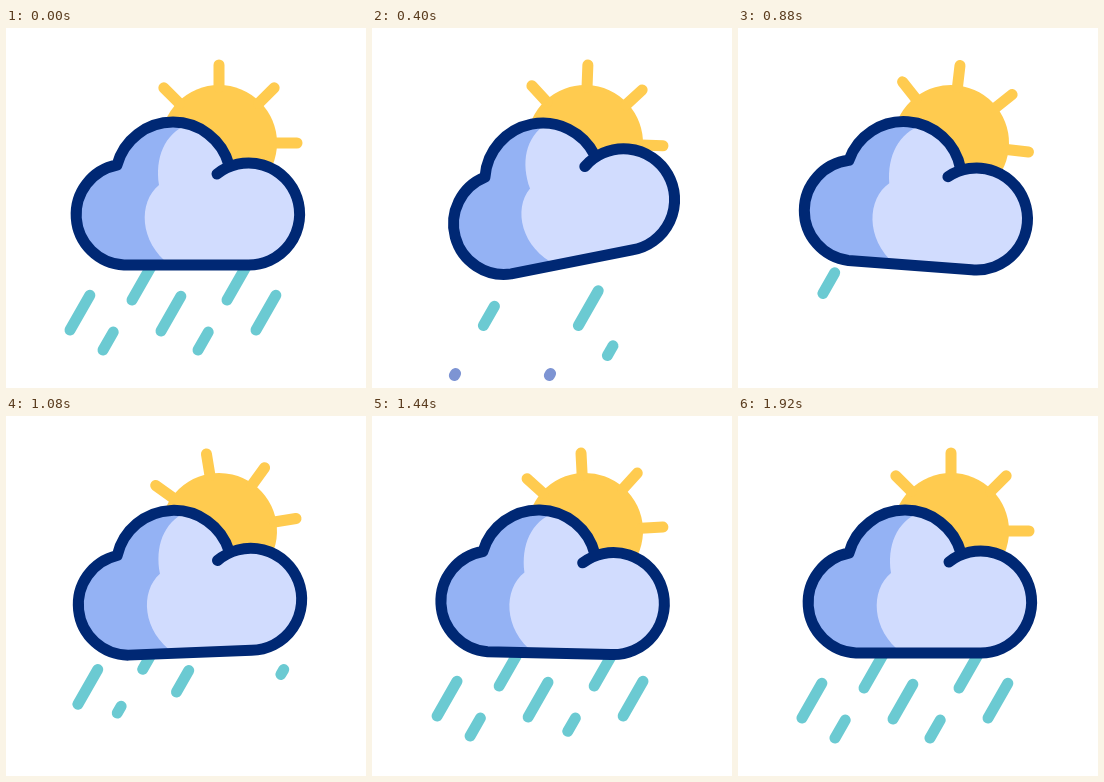
Write an HTML page that moves like this. It is 360 px wide and 360 px high and loops after 1960 ms.

```html
<!DOCTYPE html>
<html>
<head>
<meta charset="utf-8">
<style>
html, body { margin: 0; height: 100%; overflow: hidden; background: #fff; }
svg { display: block; width: 100vw; height: 100vh; }
</style>
</head>
<body>
<svg viewBox="0 0 360 360" fill="none" stroke-width="11" stroke-linecap="round" stroke-linejoin="round">
  <g id="sun" stroke="#ffcb4f">
    <circle cx="213" cy="115" r="58" fill="#ffcb4f" stroke="none"/>
  </g>
  <g id="rain"></g>
  <g id="cloud">
    <path fill="#d1dcfe" d="M118 237A50.5 50.5 0 0 1 111 137A58 58 0 0 1 223 138A51 51 0 1 1 241.5 237Z"/>
    <path fill="#94b2f4" d="M118 237A50.5 50.5 0 0 1 111 137A58 58 0 0 1 182 96C158 106 149 130 153 157C132 174 133 214 164 237Z"/>
    <path stroke="#002874" d="M223 137A58 58 0 0 0 111 137A50.5 50.5 0 0 0 118 237H241.5A51 51 0 1 0 211 146"/>
  </g>
</svg>
<script>
const LOOP = 1960, STEP = 40;
const sun = document.getElementById('sun');
const rain = document.getElementById('rain');
const cloud = document.getElementById('cloud');

function line(parent, x1, y1, x2, y2) {
  const el = document.createElementNS('http://www.w3.org/2000/svg', 'path');
  el.setAttribute('d', `M${x1} ${y1}L${x2} ${y2}`);
  parent.append(el);
  return el;
}

for (let i = 0; i < 8; i++)
  line(sun, 213, 59, 213, 37).setAttribute('transform', `rotate(${i * 45} 213 115)`);

// [time, degrees]
const spin = [[0, 0], [240, -11.5], [600, -92.5], [880, -173.4], [1280, -289], [1600, -337.5], [1920, -360]];
const sway = [[240, 0], [465, -14], [820, 5], [1140, -3], [1460, 1.4], [1740, 0]];

// head x, head y, length, start of leaving, start of entering
const drops = [
  [64, 302, 40, 20, 755],
  [126, 272, 40, 320, 900],
  [155, 303, 40, 190, 950],
  [97, 322, 20.6, 240, 1000],
  [221, 272, 40, 442, 1155],
  [250, 302, 40, 270, 1050],
  [192, 322, 20.6, 240, 1285]
].map(d => ({ d, el: line(rain, 0, 0, 0, 0) }));

const clamp = v => Math.max(0, Math.min(1, v));

// Cubic interpolation; flat keys come to rest at every turning point.
function at(keys, t, flat) {
  const last = keys.length - 1;
  if (t <= keys[0][0]) return keys[0][1];
  if (t >= keys[last][0]) return keys[last][1];
  const i = keys.findIndex(k => k[0] > t) - 1;
  const slope = j => flat || j === 0 || j === last ? 0 :
    (keys[j + 1][1] - keys[j - 1][1]) / (keys[j + 1][0] - keys[j - 1][0]);
  const [t0, a] = keys[i], [t1, b] = keys[i + 1];
  const w = t1 - t0, u = (t - t0) / w, e = u * u * (3 - 2 * u);
  return a + (b - a) * e + w * u * (1 - u) * (slope(i) * (1 - u) - slope(i + 1) * u);
}

function drawRain(t) {
  const leaving = t < 680;
  const shift = leaving ? 7.5 * (t / 240) ** 2.675
    : -7.5 * (Math.max(0, 1560 - t) / 280) ** 1.4;
  for (const { d: [x, y, len, out, into], el } of drops) {
    const head = leaving ? shift : shift - len * (1 - clamp((t - into) / 210));
    const tail = leaving ? shift - len * (1 - clamp((t - out) / 180)) : shift - len;
    const point = s => `${x - s * 0.496} ${y + s * 0.868}`;
    el.setAttribute('d', `M${point(tail)}L${point(head)}`);
    el.setAttribute('stroke', y + tail * 0.868 > 338 ? '#7d94d3' : '#6bcad2');
    el.style.display = head - tail > 0.1 ? '' : 'none';
  }
}

function draw(now) {
  const t = Math.floor(now % LOOP / STEP) * STEP;
  sun.setAttribute('transform', `rotate(${at(spin, t)} 213 115)`);
  cloud.setAttribute('transform', `rotate(${at(sway, t, true)} 174 133)`);
  drawRain(t);
  requestAnimationFrame(draw);
}
draw(performance.now());
</script>
</body>
</html>
```
